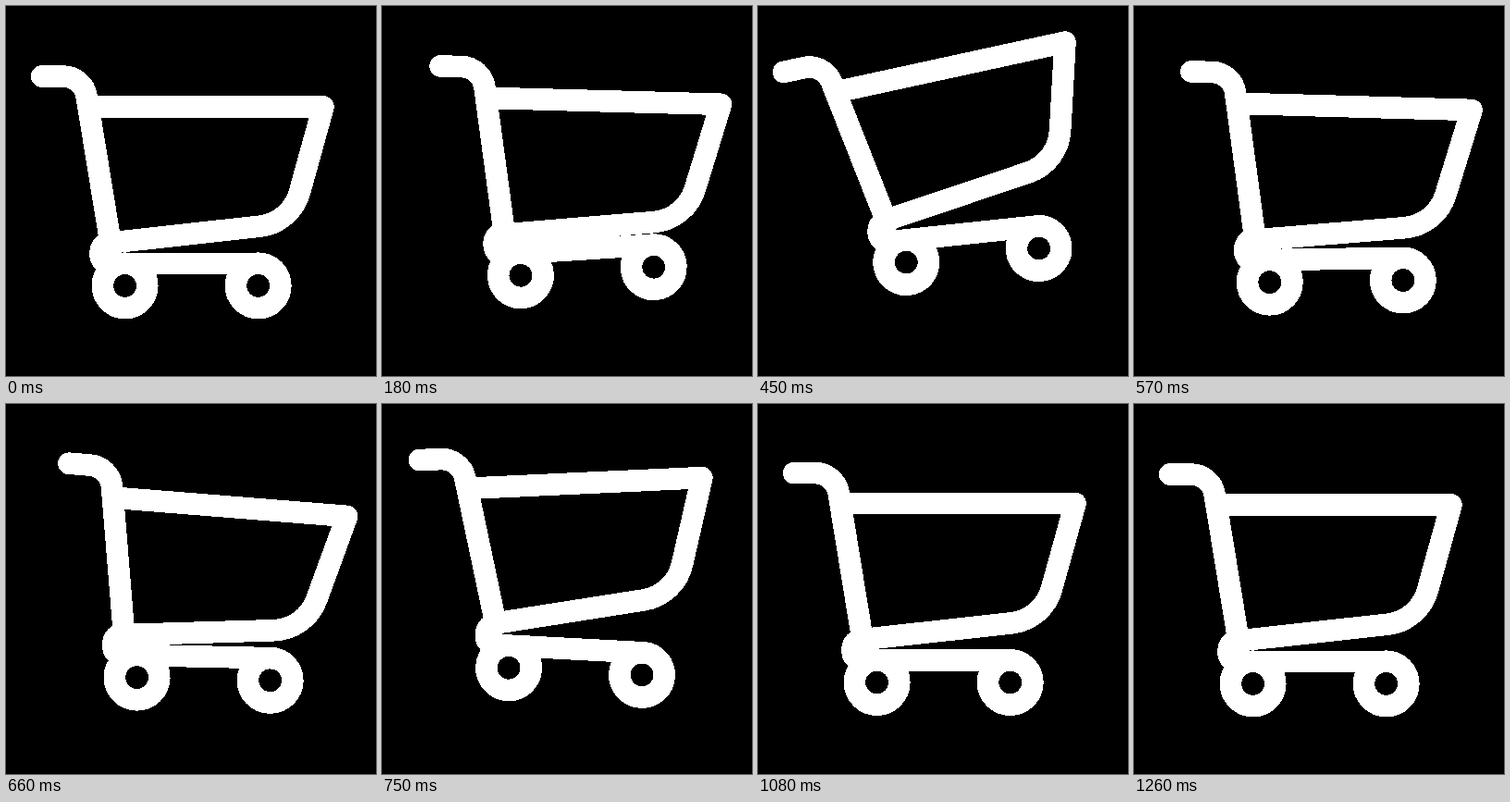
An HTML page for the animation above (3.29 s loop, 400x400 px).

```html
<!DOCTYPE html>
<html lang="en">
<head>
<meta charset="utf-8">
<title>Bouncing cart</title>
<style>
  html, body { margin: 0; width: 100%; height: 100%; overflow: hidden; background: #000; }
  svg { display: block; width: 100vw; height: 100vh; }
</style>
</head>
<body>
<svg viewBox="0 0 400 400" fill="none" stroke="#fff" stroke-width="23.6"
     stroke-linecap="round" stroke-linejoin="round" shape-rendering="crispEdges">
  <g id="cart">
    <path id="basket" d="M38.7 76H61.5A26 26 0 0 1 87.2 97.8L113 256L273.6 238.3A51 51 0 0 0 317.6 200.7L343 109H90"/>
    <g id="base">
      <path d="M114 256Q102 256 102 268Q102 278.3 114 278.3H273"/>
      <circle cx="128.6" cy="302.4" r="24.2"/>
      <circle cx="272.7" cy="302.4" r="24.2"/>
    </g>
  </g>
</svg>
<script>
const LOOP = 3290, STEP = 30;
const LAND = 600;            // end of the big hop
const JOINT = "102 268";     // basket and base both turn here

// Progress from 0 to 1 over a span of time.
const span = (t, start, length) => Math.min(1, Math.max(0, (t - start) / length));

// One rise and fall; skew above 1 moves the peak later.
const arch = (t, start, length, skew = 1) =>
  Math.max(0, Math.sin(Math.PI * span(t, start, length) ** skew));

// An arch with a soft take-off and landing.
const hop = (...args) => arch(...args) ** 1.4;

// The cart is pushed forward, then rolls back after landing.
function shift(t) {
  const drift = t < LAND
    ? Math.sin(Math.PI / 2 * t / LAND)
    : (1 - span(t, LAND, 480)) ** 1.15;
  return 16 * drift + 19.3 * hop(t, 0, LAND, 1.15);
}

const lift = t => -26 * hop(t, 0, LAND, 1.52) - 19.4 * hop(t, LAND, 360) - 1.5 * hop(t, 960, 300);

const baseTilt = t => -7.6 * hop(t, 0, LAND, 1.34) + 3.1 * hop(t, LAND, 340);

// The loose basket rocks to and fro and settles.
const basketTilt = t =>
  3.2 * arch(t, 0, 215) - 13.5 * arch(t, 215, 342, 1.2) + 5.8 * arch(t, 557, 145)
  - 3.5 * arch(t, 702, 178) + 2.1 * arch(t, 880, 200);

const setTransform = (id, value) => document.getElementById(id).setAttribute("transform", value);

function draw(now) {
  const t = Math.floor((now % LOOP) / STEP) * STEP;
  setTransform("cart", `translate(${shift(t).toFixed(3)} ${lift(t).toFixed(3)})`);
  setTransform("basket", `rotate(${basketTilt(t).toFixed(3)} ${JOINT})`);
  setTransform("base", `rotate(${baseTilt(t).toFixed(3)} ${JOINT})`);
}

function tick() {
  draw(performance.now());
  requestAnimationFrame(tick);
}

draw(0);
requestAnimationFrame(tick);
</script>
</body>
</html>
```
